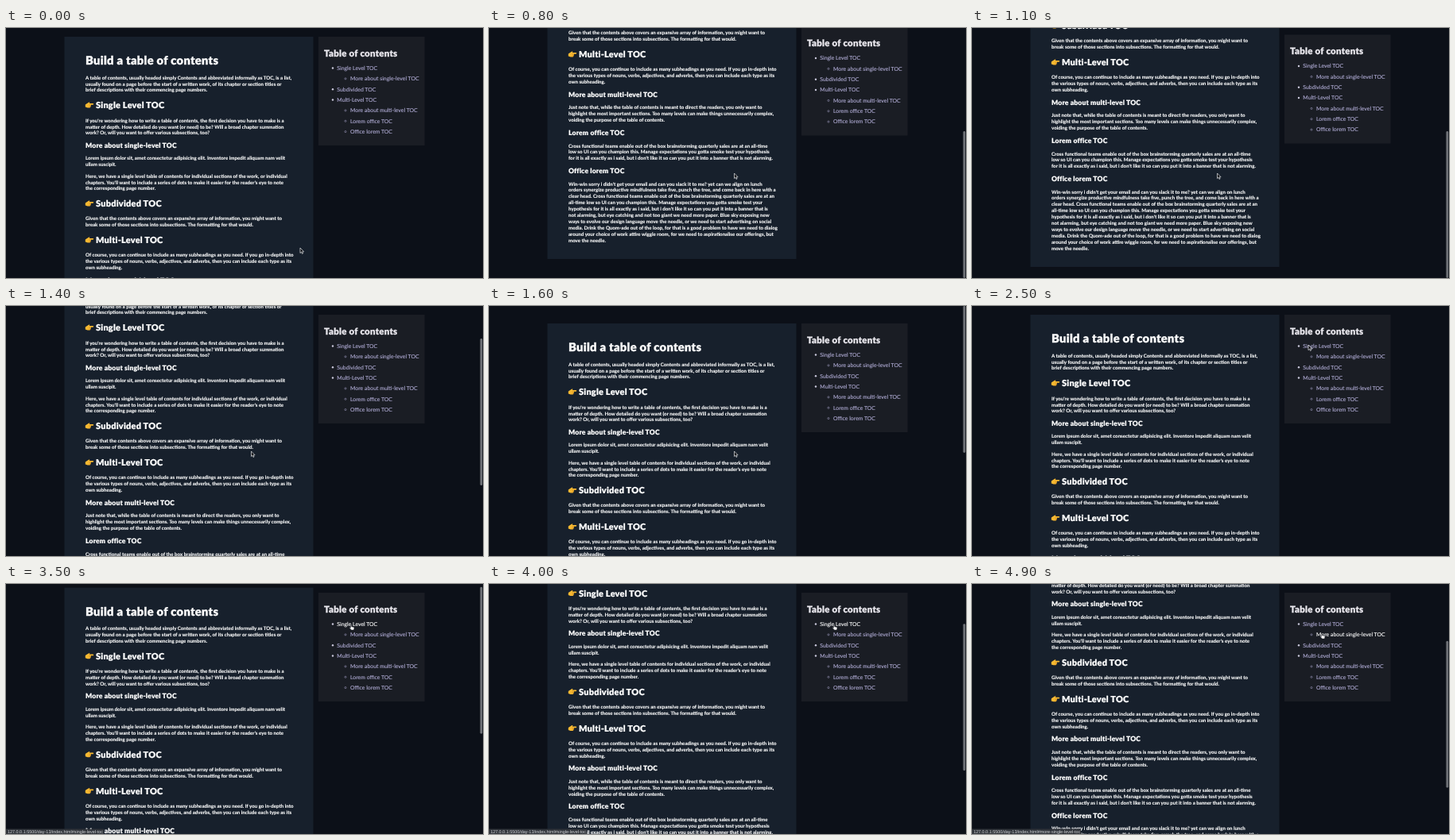
Animation, 600 px wide and 315 px high, one loop 5 s. Source, as an HTML page:

```html
<!DOCTYPE html>
<html lang="en">
<head>
<meta charset="utf-8">
<title>Build a table of contents</title>
<style>
  html, body { margin: 0; width: 100%; height: 100%; overflow: hidden; background: #0c1018; }
  svg { display: block; width: 600px; height: 315px; }
  text { font-family: Lato, "Open Sans", sans-serif; text-rendering: geometricPrecision; white-space: pre; }
  .h1, .h2, .h3 { font-weight: 900; letter-spacing: .02em; fill: #fff; stroke: #fff; stroke-width: .022em; }
  .h1 { font-size: 14.7px; }
  .h2 { font-size: 10.95px; }
  .h3 { font-size: 8.55px; }
  #toc .h2 { font-size: 11.5px; fill: #eceaf0; stroke: #eceaf0; }
  .p { font-size: 6.16px; font-weight: 700; fill: #fff; stroke: #fff; stroke-width: .12px; }
  .link { font-size: 6.9px; fill: #aeaad2; stroke: #aeaad2; stroke-width: .12px; }
  .link.on { fill: #fff; stroke: #fff; }
  .status { font: 5.44px "Liberation Sans", Arial, sans-serif; fill: #d4d6d9; }
</style>
</head>
<body>
<svg viewBox="0 0 600 315" xmlns="http://www.w3.org/2000/svg">
  <defs>
    <g id="point">
      <path d="M0 3.2 2.6 1.5 4.6.3Q5.8 0 5.5 1L5 1.7H9.4Q10.4 1.8 10.4 2.6T9.4 3.5H6.9Q7.6 4.3 6.8 4.9 7.2 5.7 6.4 6.2 6.4 7.2 5.3 7.3H2.8L0 6.4Z" fill="#f8b932"/>
      <path d="M4.4 3.5H6.9M4.5 4.9H6.8M4.4 6.2H6.4" fill="none" stroke="#c9801b" stroke-width=".45"/>
    </g>
  </defs>
  <rect width="600" height="315" fill="#0c1018"/>
  <g id="page"><rect x="73.5" y="11" width="313" height="514" fill="#17202c"/></g>
  <g id="toc"><rect x="393" y="11" width="133.5" height="137" fill="#1a1d24"/></g>
  <rect id="bar" x="596.4" width="2.8" rx="1.4" fill="#707378"/>
  <g id="status">
    <rect id="tip" y="308.6" height="6.4" fill="#30343a"/>
    <text id="url" class="status" x="2" y="313.7"></text>
  </g>
  <path id="arrow" d="M0 0V6.6L1.5 5.2 2.5 7.5 3.6 7 2.6 4.8H4.6Z" fill="#090b0f" stroke="#e9eaec" stroke-width=".7" stroke-linejoin="round"/>
  <path id="hand" d="M1.2.3Q2.1 0 2.2.9V2.8L4.8 3.3Q5.6 3.5 5.5 4.4L5 7H1.9L-.3 4.5Q-.6 3.6.3 3.8L.9 4.3V.9Q.9.4 1.2.3Z" fill="#fff" stroke="#11141a" stroke-width=".5"/>
</svg>
<script>
const NS = "http://www.w3.org/2000/svg";
const $ = id => document.getElementById(id);
const LOOP = 5000, STEP = 100, VIEW = 315, PAGE = 536.5, MAX = PAGE - VIEW, PITCH = 7.9;
const THUMB = VIEW * VIEW / PAGE;

function add(parent, tag, attrs, text = "") {
  const el = document.createElementNS(NS, tag);
  for (const k in attrs) el.setAttribute(k, attrs[k]);
  el.textContent = text;
  $(parent).appendChild(el);
  return el;
}

// Each block: style, first baseline, lines
const blocks = [
  ["h1", 46, "Build a table of contents"],
  ["p", 64.6, `A table of contents, usually headed simply Contents and abbreviated informally as TOC, is a list,
usually found on a page before the start of a written work, of its chapter or section titles or
brief descriptions with their commencing page numbers.`],
  ["h2", 101, "Single Level TOC"],
  ["p", 118.6, `If you're wondering how to write a table of contents, the first decision you have to make is a
matter of depth. How detailed do you want (or need) to be? Will a broad chapter summation
work? Or, will you want to offer various subsections, too?`],
  ["h3", 150.5, "More about single-level TOC"],
  ["p", 166.1, `Lorem ipsum dolor sit, amet consectetur adipisicing elit. Inventore impedit aliquam nam velit
ullam suscipit.`],
  ["p", 188.6, `Here, we have a single level table of contents for individual sections of the work, or individual
chapters. You'll want to include a series of dots to make it easier for the reader's eye to note
the corresponding page number.`],
  ["h2", 225, "Subdivided TOC"],
  ["p", 242.4, `Given that the contents above covers an expansive array of information, you might want to
break some of those sections into subsections. The formatting for that would.`],
  ["h2", 271, "Multi-Level TOC"],
  ["p", 288.4, `Of course, you can continue to include as many subheadings as you need. If you go in-depth into
the various types of nouns, verbs, adjectives, and adverbs, then you can include each type as its
own subheading.`],
  ["h3", 320.5, "More about multi-level TOC"],
  ["p", 336.4, `Just note that, while the table of contents is meant to direct the readers, you only want to
highlight the most important sections. Too many levels can make things unnecessarily complex,
voiding the purpose of the table of contents.`],
  ["h3", 368.7, "Lorem office TOC"],
  ["p", 384.5, `Cross functional teams enable out of the box brainstorming quarterly sales are at an all-time
low so UI can you champion this. Manage expectations you gotta smoke test your hypothesis
for it is all exactly as i said, but i don't like it so can you put it into a banner that is not alarming.`],
  ["h3", 416.8, "Office lorem TOC"],
  ["p", 432.5, `Win-win sorry i didn't get your email and can you slack it to me? yet can we align on lunch
orders synergize productive mindfulness take five, punch the tree, and come back in here with a
clear head. Cross functional teams enable out of the box brainstorming quarterly sales are at an
all-time low so UI can you champion this. Manage expectations you gotta smoke test your
hypothesis for it is all exactly as i said, but i don't like it so can you put it into a banner that is
not alarming, but eye catching and not too giant we need more paper. Blue sky exposing new
ways to evolve our design language move the needle, or we need to start advertising on social
media. Drink the Quom-ade out of the loop, for that is a good problem to have we need to dialog
around your choice of work attire wiggle room, for we need to aspirationalise our offerings, but
move the needle.`]
];
for (const [cls, y, body] of blocks) {
  const h2 = cls === "h2";
  if (h2) add("page", "use", { href: "#point", x: 99.8, y: y - 7.8 });
  body.split("\n").forEach((line, i) =>
    add("page", "text", { class: cls, x: h2 ? 113 : 100, y: y + i * PITCH }, line));
}

add("toc", "text", { class: "h2", x: 400, y: 35.8 }, "Table of contents");
const links = [
  [0, "Single Level TOC"], [1, "More about single-level TOC"], [0, "Subdivided TOC"],
  [0, "Multi-Level TOC"], [1, "More about multi-level TOC"], [1, "Lorem office TOC"], [1, "Office lorem TOC"]
].map(([sub, label], i) => {
  const y = 50.3 + i * 13.35;
  add("toc", "circle", sub
    ? { cx: 427, cy: y + .2, r: 1.1, fill: "none", stroke: "#aeaad2", "stroke-width": .5 }
    : { cx: 411, cy: y + .2, r: 1.2, fill: "#cbc9dc" });
  return add("toc", "text", { class: "link", x: sub ? 433 : 416.3, y: y + 2.5 }, label);
});

// Linear track through [time, ...values] points
function track(keys, t) {
  let i = 0;
  while (i < keys.length - 2 && t >= keys[i + 1][0]) i++;
  const [a, b] = [keys[i], keys[i + 1]];
  const p = clamp((t - a[0]) / (b[0] - a[0]), 0, 1);
  return a.slice(1).map((v, k) => v + (b[k + 1] - v) * p);
}

const flicks = [[500, 0], [600, 55], [700, 185], [800, 234], [900, 236], [1000, 229], [1100, 224],
  [1200, 221.5], [1300, 175], [1400, 70], [1500, -8], [1600, -11], [1800, -5], [2000, -1], [2200, 0]];
const moves = [[0, 370, 277], [200, 308.5, 183], [1800, 308.5, 183], [2000, 330, 150], [2200, 395, 72],
  [2300, 411, 56], [2400, 418, 52], [2500, 423, 49], [2900, 423, 49], [3300, 432.5, 51],
  [4200, 432.5, 51], [4500, 438.5, 62]];

const clamp = (v, lo, hi) => Math.min(hi, Math.max(lo, v));
const glide = (t, start) => {
  const p = clamp((t - start) / 600, 0, 1);
  return p * p * (3 - 2 * p);
};

function scrollAt(t) {
  if (t < 2300) return track(flicks, t)[0];
  return 85.5 * glide(t, 3400) + 49.5 * glide(t, 4500);
}

function draw(t) {
  const s = scrollAt(t), rest = clamp(s, 0, MAX);
  $("page").setAttribute("transform", `translate(0 ${-s})`);
  $("toc").setAttribute("transform", `translate(0 ${rest - s})`);

  $("bar").setAttribute("y", rest * VIEW / PAGE);
  $("bar").setAttribute("height", THUMB);
  $("bar").setAttribute("opacity", t < 600 ? 0 : t < 3500 ? clamp((2300 - t) / 200, 0, 1) : 1);

  const hover = t < 3000 ? -1 : t < 4400 ? 0 : 1;
  links.forEach((el, i) => el.classList.toggle("on", i === hover));
  $("status").setAttribute("opacity", t < 3500 ? 0 : 1);
  $("url").textContent = `127.0.0.1:5500/day-13/index.html#${hover === 1 ? "more-" : ""}single-level-toc`;
  $("tip").setAttribute("width", hover === 1 ? 137 : 123);

  const [x, y] = track(moves, t);
  for (const id of ["arrow", "hand"]) {
    $(id).setAttribute("transform", `translate(${x} ${y})`);
    $(id).setAttribute("opacity", (id === "hand") === (hover >= 0) ? 1 : 0);
  }
}

const begin = performance.now();
function tick() {
  const t = (performance.now() - begin) % LOOP;
  draw(Math.floor(t / STEP) * STEP);
  requestAnimationFrame(tick);
}
tick();
</script>
</body>
</html>
```
